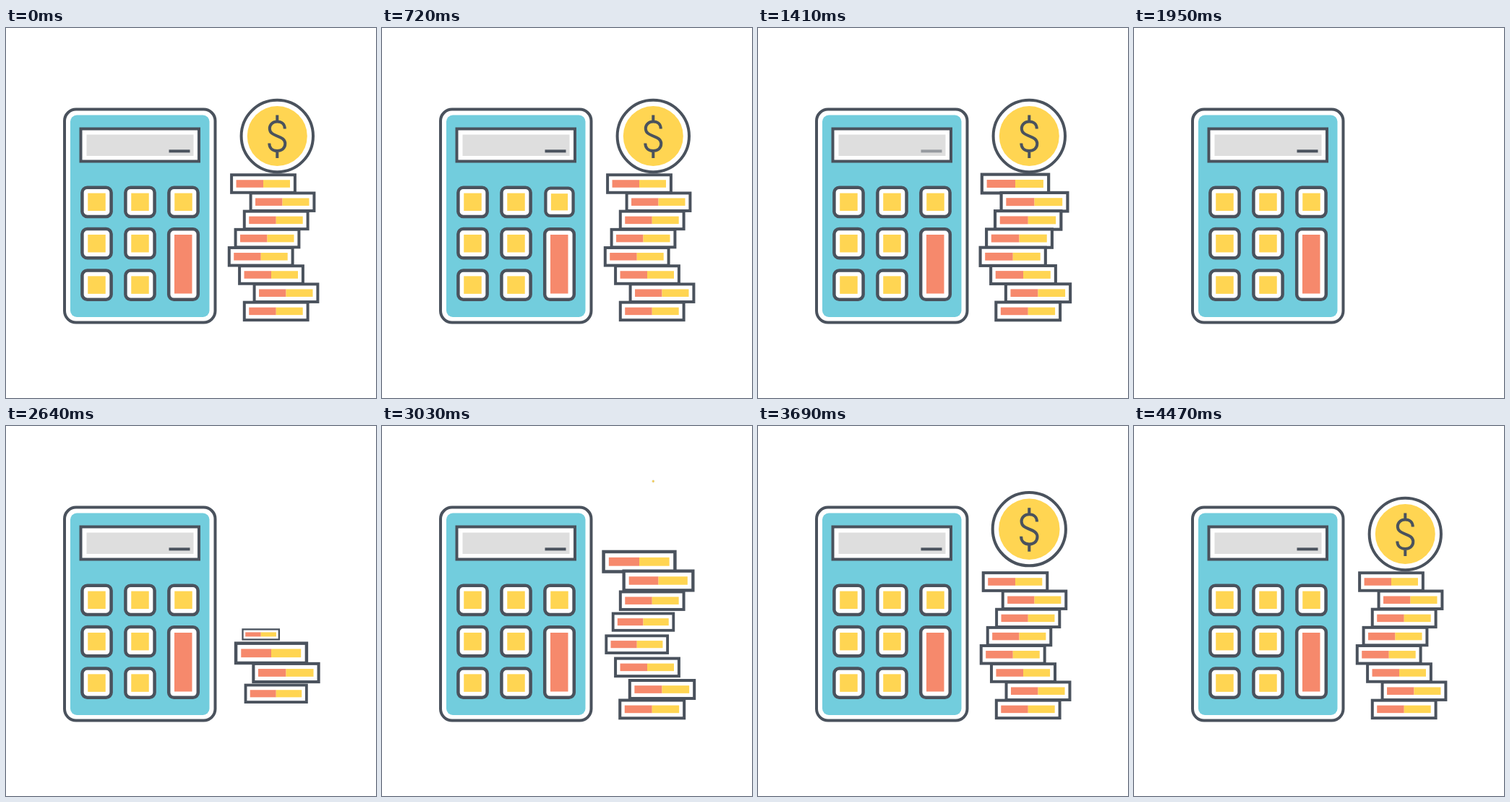
Animation of 512 by 512 pixels, one loop 4500 ms. Source, as an HTML page:

```html
<!DOCTYPE html>
<html lang="en">
<head>
<meta charset="utf-8">
<title>Calculator and coins</title>
<style>
  html, body { margin: 0; width: 100%; height: 100%; overflow: hidden; background: #fff; }
  svg { display: block; width: 100%; height: 100%; }
  .line { fill: #fff; stroke: #4a525d; stroke-width: 4; }
  .ink { fill: none; stroke: #4a525d; stroke-width: 4; }
  .key { stroke-width: 4.5; }
  .blue { fill: #72cddd; }
  .gray { fill: #dedede; }
  .yellow { fill: #ffd552; }
  .salmon { fill: #f6896c; }
  #cursor { animation: blink 4.5s linear infinite; }
  @keyframes blink {
    0%, 29.3% { opacity: 1; }
    33.3% { opacity: 0; }
    37.3%, 100% { opacity: 1; }
  }
</style>
</head>
<body>
<svg viewBox="0 0 512 512">
  <rect class="line" x="81" y="112.6" width="208.5" height="295" rx="16"/>
  <rect class="blue" x="89" y="120.5" width="192.5" height="279.5" rx="9"/>
  <rect class="line" x="103.5" y="139.5" width="163.5" height="45"/>
  <rect class="gray" x="111.5" y="147.5" width="148" height="29.5"/>
  <path id="cursor" class="ink" d="M225.5 170.4H254.5"/>
  <g id="keys"></g>
  <rect class="line key" x="225.2" y="278.3" width="40.6" height="97.5" rx="7"/>
  <rect class="salmon" x="233" y="286" width="24.5" height="81.5"/>
  <g id="bars"></g>
  <g id="coin">
    <circle class="line" r="49.7"/>
    <circle class="yellow" r="41.5"/>
    <path class="ink" d="M10.5-10C10.5-16.5 6-20 0-20S-10.5-16-10.5-10.5C-10.5-4-5-2 0 0S11 4 11 10.5 6 20.5 0 20.5-11 17-11 10M0-29V-20M0 20.5V30.5"/>
  </g>
</svg>
<script>
const LOOP = 4500, REBUILD = 2270, STAGGER = 90;
const { PI, sin, cos, exp, min, max } = Math;
const $ = id => document.getElementById(id);

function add(parent, tag, attrs = {}) {
  const el = document.createElementNS('http://www.w3.org/2000/svg', tag);
  for (const name in attrs) el.setAttribute(name, attrs[name]);
  return parent.appendChild(el);
}

// Rectangle centred on x, 0
const box = (parent, cls, w, h, x = 0, rx = 0) =>
  add(parent, 'rect', { class: cls, x: x - w / 2, y: -h / 2, width: w, height: h, rx });

const place = (el, x, y, s) =>
  el.setAttribute('transform', `translate(${x} ${y}) scale(${max(0, s)})`);

const clamp = x => min(1, max(0, x));
const fall = x => (1 + cos(PI * clamp(x))) / 2;
const press = x => 1 - .05 * sin(PI * clamp(x));
const backOut = x => 1 + 1.35 * x ** 2 - 2.35 * x ** 3;

// Fast growth with a damped wobble
function pop(ms) {
  const u = max(0, ms - 40);
  return clamp(ms / 130) ** 3 + .2 * exp(-.0036 * u) * sin(PI * u / 270);
}

// Key index: time of its press
const presses = { 2: 600, 3: 4230 };
const keys = [];
for (let row = 0; row < 3; row++) {
  for (let col = 0; col < (row ? 2 : 3); col++) {
    const el = add($('keys'), 'g');
    box(el, 'line key', 40.2, 40.2, 0, 7);
    box(el, 'yellow', 24.5, 24.5);
    keys.push({ el, x: 125.5 + 60 * col, y: 240.8 + 57.4 * row, start: presses[keys.length] ?? LOOP });
  }
}

const bars = [356, 382.5, 373.7, 361.5, 352.7, 367, 387.5, 373.7].map((x, i) => {
  const el = add($('bars'), 'g');
  box(el, 'line', 87.8, 24.5);
  box(el, 'salmon', 37.5, 10.5, -18.7);
  box(el, 'yellow', 37, 10.5, 18.5);
  return { el, x, y: 215.5 + 25.2 * i, hide: 1254 + 14 * i, show: REBUILD + STAGGER * (7 - i) };
});

function draw(t) {
  const leaving = t < 2200;
  for (const k of keys) place(k.el, k.x, k.y, press((t - k.start) / 240));

  for (const b of bars) {
    const age = t - b.show;
    if (leaving) place(b.el, b.x, b.y, backOut(clamp((t - b.hide) / 590)));
    else place(b.el, b.x, b.y - 28 * fall(clamp(age / 760) ** 1.6), pop(age));
  }

  const y = leaving ? 149.5 : 149.5 - 73 * fall((t - 3330) / 450);
  const size = leaving ? 1 - clamp((t - 1410) / 365) ** 2 : pop(t - REBUILD - 8 * STAGGER);
  place($('coin'), 375.3, y, size);
}

const begin = performance.now();
function tick() {
  draw((performance.now() - begin) % LOOP);
  requestAnimationFrame(tick);
}
tick();
</script>
</body>
</html>
```
